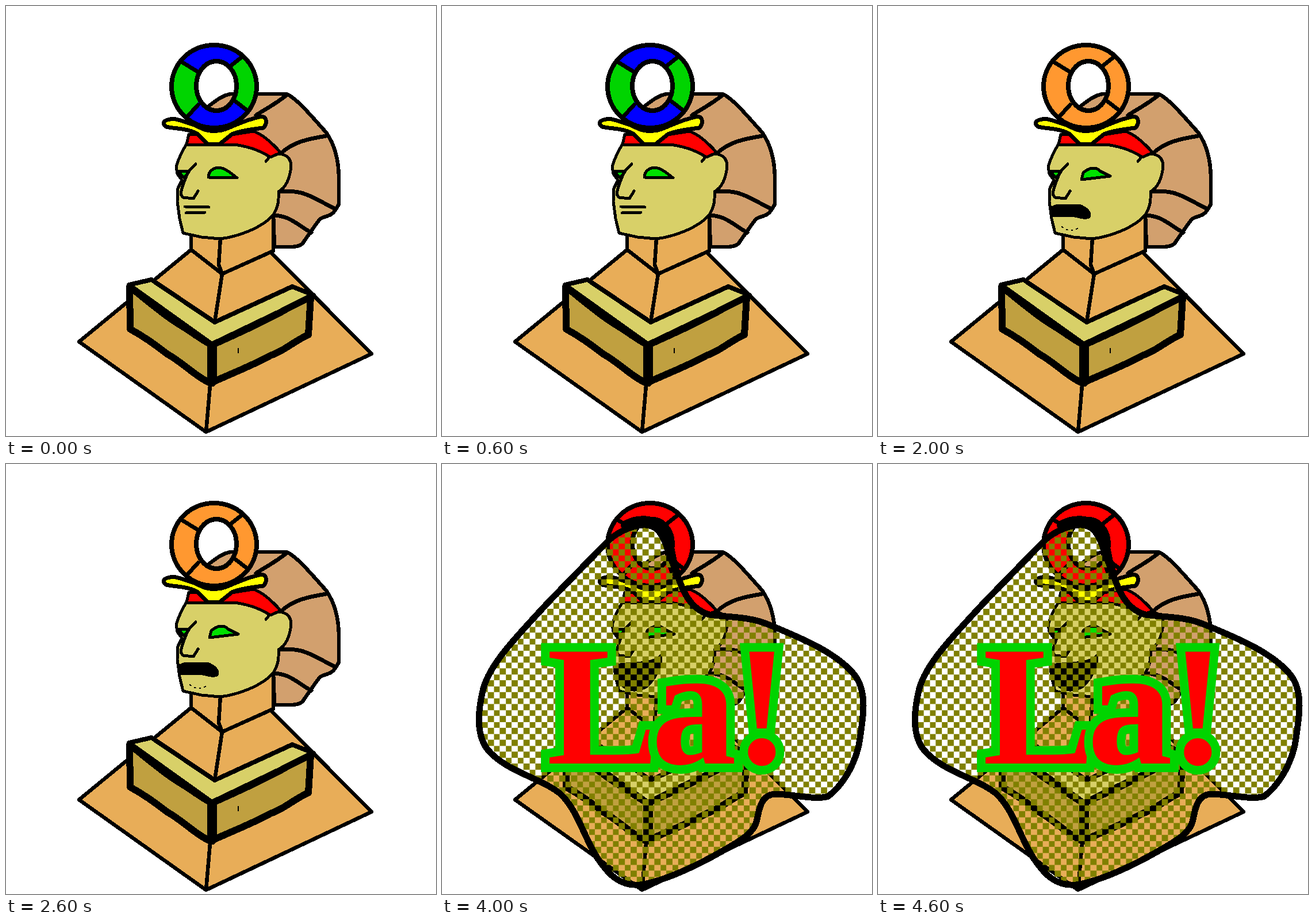
These frames come from a looping animation (748 px wide and 748 px high, 5000 ms). An HTML page:

```html
<!DOCTYPE html>
<html lang="en">
<head>
<meta charset="utf-8">
<title>Singing bust</title>
<style>
html, body { margin: 0; width: 100%; height: 100%; overflow: hidden; background: #fff; }
svg { display: block; width: 100vw; height: 100vh; }
path, polygon, ellipse { shape-rendering: crispEdges; }
.ink { stroke: #000; stroke-width: 6.5; stroke-linejoin: round; stroke-linecap: round; }
.line { fill: none; }
.sand { fill: #e8ad58; }
.face { fill: #d8d068; }
.brick { fill: #c0a040; }
.cloth { fill: #d2a06e; }
.thin { stroke-width: 5; }
.thick { stroke-width: 8; }
.heavy { stroke-width: 12; }
text { font-family: "Liberation Serif", "Times New Roman", serif; font-weight: bold; fill: #f00;
  stroke: #00d400; stroke-linejoin: miter; paint-order: stroke; }
</style>
</head>
<body>
<svg viewBox="0 0 748 748">
  <defs>
    <clipPath id="ringClip">
      <path clip-rule="evenodd" d="M288 140a74 72 0 1 0 148 0a74 72 0 1 0-148 0zM331 139a35 43 0 1 0 70 0a35 43 0 1 0-70 0z"/>
    </clipPath>
    <pattern id="check" width="2" height="2" patternUnits="userSpaceOnUse">
      <path fill="#808000" d="M0 0h1v1h-1zM1 1h1v1h-1z"/>
    </pattern>
  </defs>

  <g id="pyramid" class="ink">
    <path class="sand" d="M322 424L127 584L348 741L636 605L460 428L376 466z"/>
    <path class="line" d="M376 466L363 550M355 660L348 741"/>
    <path class="sand" d="M322 396V424L376 466L465 426V360z"/>
    <path class="line" d="M373 404L370 450L376 466"/>
  </g>

  <g id="box" class="ink">
    <path class="face thick" d="M214 485L253 476L363 550L498 488L535 503L358 588z"/>
    <path class="brick heavy" d="M215 488L216 562C245 578 260 590 280 605C310 622 330 645 356 656L358 590C330 574 320 565 300 553C275 538 245 512 215 488z"/>
    <path class="brick heavy" d="M358 590C400 571 450 549 488 527L530 506L526 572C500 583 485 600 460 608C430 625 390 640 356 656z"/>
    <path class="line heavy" style="stroke-width:17" d="M358 592V654"/>
    <path class="line" style="stroke-width:1.5" d="M404 596V603"/>
  </g>

  <g id="headdress" class="ink">
    <path class="cloth" d="M350 176C365 165 375 156 390 153H488C505 160 530 190 557 220C573 243 579 270 579 300V345L573 355C565 368 550 365 545 372C535 385 525 400 516 413C508 421 490 419 467 419L465 362L440 230L350 200z"/>
    <path class="line" style="stroke-width:7" d="M488 155C470 170 450 180 435 190M557 226C520 232 500 238 482 253M474 323C520 318 535 335 573 353M465 364C495 365 505 380 531 394"/>
  </g>

  <g id="head" class="ink thin">
    <path class="face" d="M314 240C305 255 300 265 296 280L298 292L306 303L299 317L298 340L302 370L308 395L340 402L372 405C400 402 445 387 465 363C473 350 475 340 474 323C488 315 494 300 496 278C495 258 475 252 460 262L430 240z"/>
    <path class="line" d="M452 270L460 261"/>
    <path fill="#f00" d="M318 223L314 241H398C430 246 445 254 460 263L478 255C460 235 445 222 430 218L380 226z"/>
    <path id="leftEye" fill="#00d800" d="M299 287H319L310 299z"/>
    <path class="line" d="M330 275L318 287C312 300 305 315 304 328L308 333L326 335L334 322"/>
    <path id="eye" fill="#00e000"/>
    <path id="mouth"/>
    <path id="stubble" class="line" style="stroke-width:2" stroke-dasharray="2 7" d="M320 384C330 392 342 393 350 384"/>
  </g>

  <path class="ink" style="stroke-width:7" fill="#ff0" d="M274 205C274 197 290 195 300 198L325 206C338 211 345 217 355 217H368C385 217 405 200 445 192C455 194 454 205 448 212C430 214 405 218 393 223L372 240H350L334 223C315 212 295 214 278 210z"/>

  <g id="ring">
    <g clip-path="url(#ringClip)">
      <path id="ends" d="M280 60H450V220H280z"/>
      <path id="sides" d="M270 73L333 114L334 172L300 210H270zM450 55L390 105L398 165L455 207z"/>
    </g>
    <g class="ink line thick">
      <ellipse cx="362" cy="140" rx="74" ry="72"/>
      <ellipse cx="366" cy="139" rx="35" ry="43"/>
      <path style="stroke-width:7" d="M305 97L333 114M411 88L390 105M398 165L420 182M334 172L315 193"/>
    </g>
  </g>

  <path id="shade" class="ink line" style="stroke-width:18" d="M320 107C345 94 375 97 388 120C397 140 395 160 405 187"/>
  <path id="cloud" class="ink" fill="url(#check)"/>
  <text id="note">La!</text>
</svg>
<script>
const $ = id => document.getElementById(id);
const set = (id, attrs) => {
  for (const key in attrs) $(id).setAttribute(key, attrs[key]);
};
const show = (id, on) => { $(id).style.display = on ? "" : "none"; };

const calmEye = "M352 298C352 285 365 279 375 282C385 284 392 292 402 299z";
const slyEye = "M354 302L357 290C368 280 380 280 386 287L404 296z";
const openMouth = "M302 351L312 347H350C362 351 371 360 367 367C358 371 345 364 335 364H302z";

const poses = [
  { ends: "#00f", sides: "#00d400", eye: calmEye, mouth: "M311 349L353 350M313 360L346 359" },
  { ends: "#ff0", eye: calmEye, mouth: "M303 356L318 349L350 350L360 356M303 356L313 361H340L349 356" },
  { ends: "#ff9830", eye: slyEye, mouth: openMouth, filled: true, stubble: true },
  {
    ends: "#f00", eye: calmEye, mouth: openMouth, filled: true,
    cloud: "M329 112C340 96 385 90 394 114C405 140 415 192 440 212C455 222 510 212 560 238C600 258 644 290 645 345C645 395 625 440 606 465C592 475 560 465 540 464C515 463 513 480 515 496C490 530 420 580 366 584C330 584 318 560 308 540C295 505 285 470 265 458C235 438 190 430 175 405C158 370 162 320 185 285C215 235 290 165 329 112z",
    edge: 8, cell: 7.48, shift: "7.48 0",
    note: { x: "290 358 416", y: 371, size: 112, outline: 13 }
  },
  {
    ends: "#f00", eye: slyEye, filled: true, shade: true,
    mouth: "M303 350C330 345 365 350 380 334C384 350 370 375 355 388C335 397 320 395 303 375z",
    cloud: "M287 136C300 122 325 108 350 106C375 104 385 125 393 150C400 170 408 190 415 208C425 235 440 255 465 262C500 267 535 265 570 280C630 305 690 330 720 370C740 400 733 440 725 490C715 530 695 560 672 578C650 585 615 575 580 574C555 575 552 600 548 618C545 640 520 655 490 672C450 695 390 725 345 732C310 735 290 715 270 685C245 645 235 600 205 573C170 545 110 535 78 495C60 470 62 430 72 390C85 345 130 300 190 235C220 205 255 168 287 136z",
    edge: 11, cell: 10.35, shift: "-3.2 -17.2",
    note: { x: "182 364 507", y: 521, size: 297, outline: 30 }
  }
];

function draw(pose) {
  set("ends", { fill: pose.ends });
  set("sides", { fill: pose.sides || pose.ends });
  set("eye", { d: pose.eye });
  set("mouth", { d: pose.mouth, fill: pose.filled ? "#000" : "none" });
  show("stubble", pose.stubble);
  show("shade", pose.shade);
  show("cloud", pose.cloud);
  show("note", pose.note);
  if (!pose.cloud) return;
  const { x, y, size, outline } = pose.note;
  set("cloud", { d: pose.cloud, style: `stroke-width:${pose.edge}` });
  set("check", { patternTransform: `translate(${pose.shift}) scale(${pose.cell})` });
  set("note", { x, y, "font-size": size, "stroke-width": outline });
}

const start = performance.now();
let current = -1;
function tick() {
  const index = Math.floor((performance.now() - start) / 1000) % poses.length;
  if (index !== current) draw(poses[current = index]);
  requestAnimationFrame(tick);
}
tick();
</script>
</body>
</html>
```
